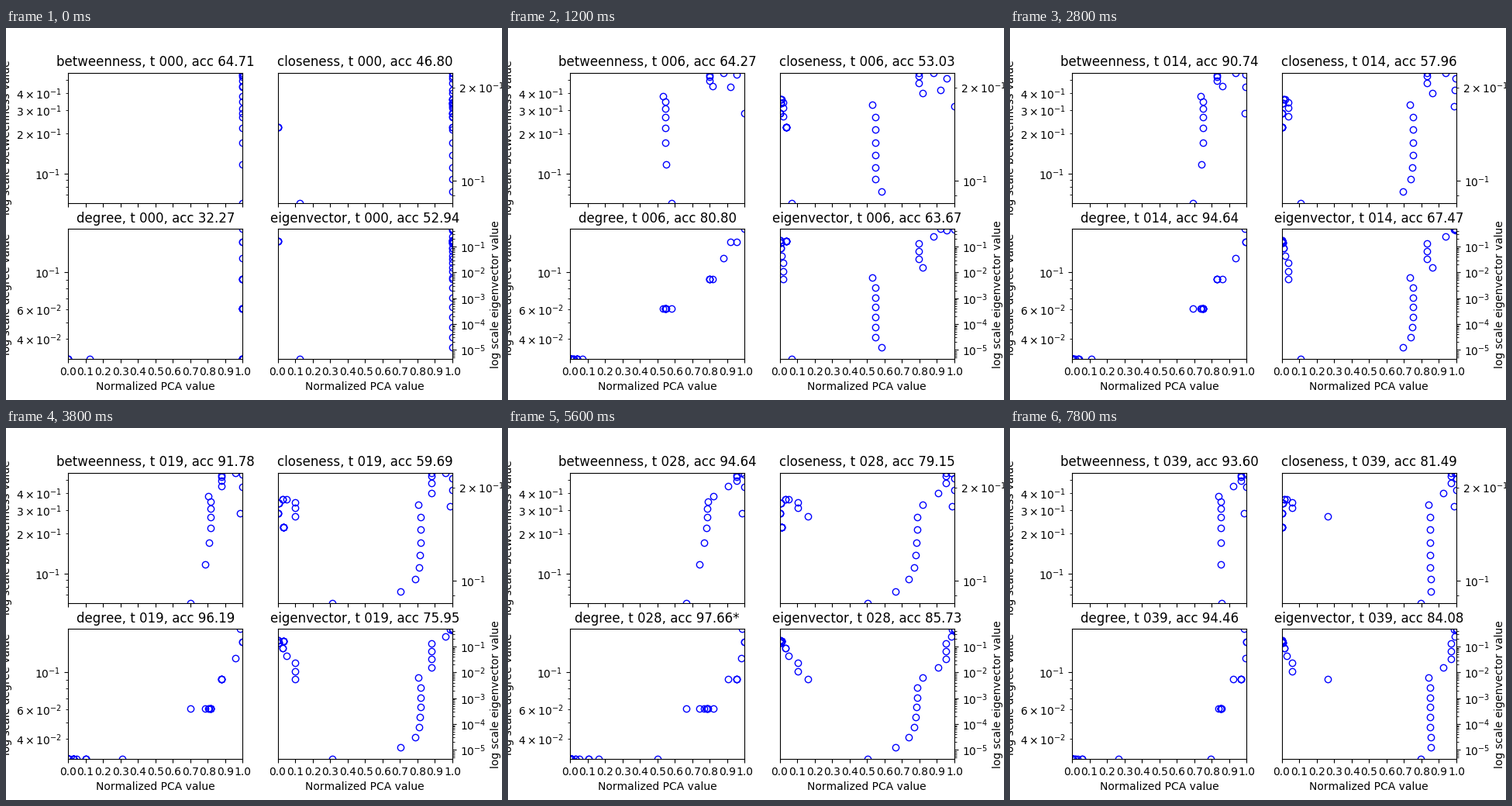
These frames come from a looping animation (640x480 px, 8000 ms). A matplotlib script:

```python
import numpy as np
import matplotlib.pyplot as plt
from matplotlib.animation import FuncAnimation

plt.rcParams["text.kerning_factor"] = 6

# Caterpillar tree: a spine of 17 nodes with bunches of leaves near one end
SPINE = 17
LEAVES = [1, 1, 1, 1, 2, 3, 3, 5]
parents = np.repeat(np.arange(9, SPINE), LEAVES)
N = SPINE + len(parents)
edges = [(i, i + 1) for i in range(SPINE - 1)]
edges += [(p, SPINE + k) for k, p in enumerate(parents)]

adj = np.zeros((N, N))
for a, b in edges:
    adj[a, b] = adj[b, a] = 1


def distances(adj):
    d = np.where(adj > 0, 1.0, np.inf)
    np.fill_diagonal(d, 0)
    for k in range(N):
        d = np.minimum(d, d[:, k:k + 1] + d[k])
    return d


def betweenness(d):
    out = np.zeros(N)
    for v in range(N):
        on_path = d[:, v:v + 1] + d[v] == d
        on_path[v, :] = on_path[:, v] = False
        np.fill_diagonal(on_path, False)
        out[v] = on_path.sum() / ((N - 1) * (N - 2))
    return np.where(out > 0, out, np.nan)


dist = distances(adj)
measures = {
    "betweenness": betweenness(dist),
    "closeness": (N - 1) / dist.sum(axis=1),
    "degree": adj.sum(axis=1) / (N - 1),
    "eigenvector": np.abs(np.linalg.eigh(adj)[1][:, -1]),
}

FIRST = 6  # the fast opening phase lasts this many steps
KEYS = [FIRST, 14, 19, 28, 33, 39]
TRACKS = {
    "end": [.069, .109, .312, .503, .588, .796],
    "neck": [.582, .693, .702, .665, .680, .854],
    "path": [.546, .750, .818, .788, .751, .850],
    "low_leaf": [.020, .038, .100, .162, .193, .264],
    "mid_leaf": [.018, .036, .100, .105, .100, .058],
    "hub_leaf": [.038, .002, .033, .010, .006, .001],
}
ACC = {
    "betweenness": [64.71, 64.27, 90.74, 91.78, 94.64, 95.16, 93.60],
    "closeness": [46.80, 53.03, 57.96, 59.69, 79.15, 83.39, 81.49],
    "degree": [32.27, 80.80, 94.64, 96.19, 97.66, 96.37, 94.46],
    "eigenvector": [52.94, 63.67, 67.47, 75.95, 85.73, 88.24, 84.08],
}
BEST = {"betweenness": (30, 33), "closeness": (33,), "degree": (28,), "eigenvector": (33,)}

start = np.ones(N)
start[0] = .125
start[-3:] = 0


def ease_out(f):
    return 1 - (1 - f) ** 2


def layout(t):
    """PCA value of every node once the opening phase is over."""
    at = {name: np.interp(t, KEYS, track) for name, track in TRACKS.items()}
    settle = np.exp(-t / 3.5)

    x = np.empty(SPINE)
    x[0] = at["end"]
    x[1:9] = at["path"] + (at["neck"] - at["path"]) * (t / 70) ** np.arange(8)
    x[8] += .06 * np.exp(-((t - 30.5) / 5) ** 2) - .015
    x[9] = .95 - .18 * np.exp(-t / 20)
    x[10:13] = .79 + .18 / (1 + np.exp((19 - t) / 4))
    x[13] = 1 - .2 * np.exp(-t / 12)
    x[14] = 1 - .25 * settle
    x[15] = 1 - .45 * settle
    x[16] = .986 + .08 * settle

    mid = at["mid_leaf"]
    leaf = [at["low_leaf"], mid, mid, .5 * mid, .3 * mid, .005, .003, at["hub_leaf"]]
    return np.clip(np.r_[x, np.repeat(leaf, LEAVES)], 0, 1)


def positions(t):
    if t >= FIRST:
        return layout(t)
    return start + (layout(FIRST) - start) * ease_out(t / FIRST)


def accuracy(name, t):
    """Share of ordered node pairs, so it moves in steps of 1 / N**2."""
    if t < FIRST:
        t = FIRST * ease_out(t / FIRST)
    share = np.interp(t, [0] + KEYS, ACC[name]) / 100
    return round(share * N * N) / (N * N) * 100


fig, axes = plt.subplots(2, 2, figsize=(6.4, 4.8), dpi=100)
panels = []
for i, (name, values) in enumerate(measures.items()):
    ax = axes.flat[i]
    ax.set_yscale("log")
    ax.set_xlim(0, 1)
    ax.set_ylim(np.nanmin(values), np.nanmax(values))
    ax.set_xticks(np.arange(11) / 10)
    ax.set_ylabel(f"log scale {name} value")
    if i % 2:
        ax.yaxis.tick_right()
        ax.yaxis.set_label_position("right")
    if i < 2:
        ax.tick_params(labelbottom=False)
    else:
        ax.set_xlabel("Normalized PCA value")
    dots, = ax.plot(start, values, "o", mfc="none", mec="b", mew=1, ms=6)
    panels.append((name, ax, dots))


def draw(t):
    x = positions(t)
    for name, ax, dots in panels:
        dots.set_xdata(x)
        star = "*" if t in BEST[name] else ""
        ax.set_title(f"{name}, t {t:03d}, acc {accuracy(name, t):.2f}{star}")
    return [dots for _, _, dots in panels]


anim = FuncAnimation(fig, draw, frames=40, interval=200, repeat=True, repeat_delay=0)
plt.show()
```
